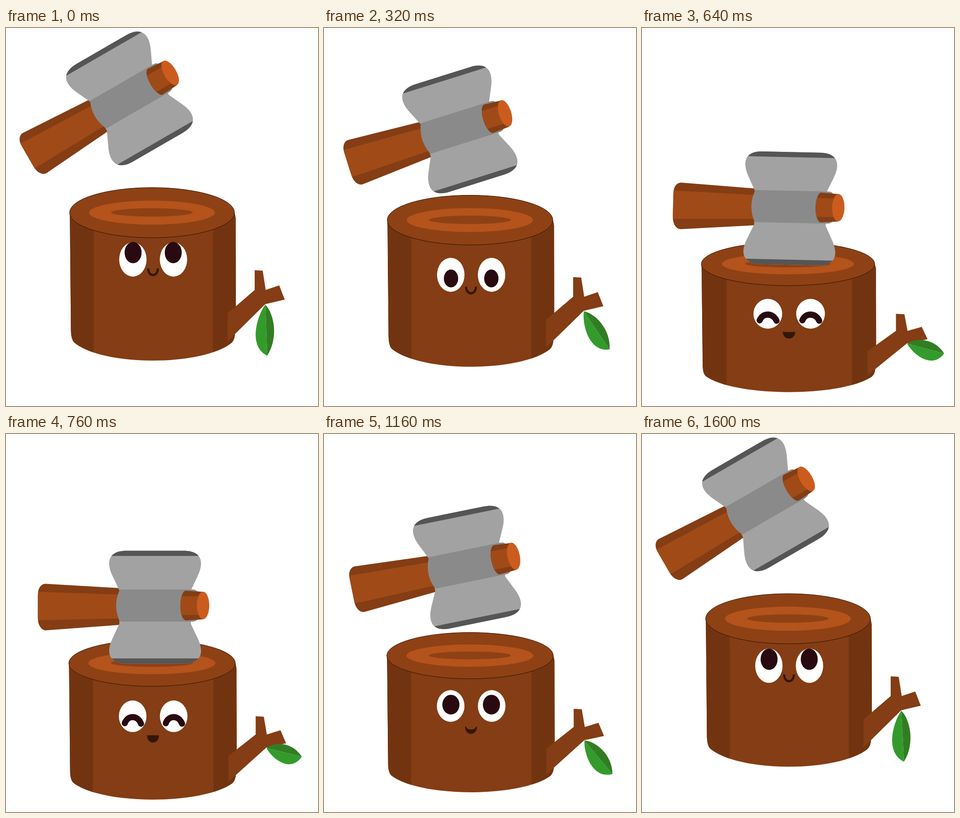
Recreate the animation shown at these times as an HTML page. Size 680x824 px, loop 1.64 s.

```html
<!DOCTYPE html>
<html lang="en">
<head>
<meta charset="utf-8">
<title>Axe and stump</title>
<style>
  html, body { margin: 0; width: 100%; height: 100%; overflow: hidden; background: #fff; }
  svg { display: block; width: 100%; height: 100%; }
</style>
</head>
<body>
<svg viewBox="0 0 680 824">
  <defs>
    <path id="trunk" d="M139 403L139.5 440L141.5 660Q142 678 148 685C180 712 250 725 320 725S460 712 492 686Q499 679 499.5 662L501 600L500.5 414L498 402Z"/>
    <clipPath id="trunkClip"><use href="#trunk"/></clipPath>
    <path id="blade" d="M-78 -28V-36L-93 -68C-108 -100 -100 -122.5 -62 -122.5H62C100 -122.5 108 -100 93 -68L78 -36V-28Z"/>
    <clipPath id="bladeClip"><use href="#blade"/></clipPath>
    <g id="bladeHalf">
      <use href="#blade" fill="#a2a2a2"/>
      <rect x="-110" y="-124" width="220" height="12.8" fill="#555" clip-path="url(#bladeClip)"/>
    </g>
    <ellipse id="white" rx="29.8" ry="37.4" fill="#fff"/>
    <ellipse id="pupil" rx="18.5" ry="23.3" fill="#280a10"/>
    <path id="lid" d="M-17 16.5C-11 -3 11 -3 18 17.5" fill="none" stroke="#280a10" stroke-width="13.3" stroke-linecap="round" vector-effect="non-scaling-stroke"/>
  </defs>

  <g id="stump">
    <use href="#trunk" fill="#843d14"/>
    <path d="M130 390H191V730H130ZM451 390H510V730H451Z" fill="#723410" clip-path="url(#trunkClip)"/>
    <ellipse cx="318.3" cy="402.5" rx="179.7" ry="54.7" fill="#8e4114" stroke="#2b1206" vector-effect="non-scaling-stroke"/>
    <ellipse cx="318" cy="402.5" rx="137" ry="26.3" fill="#b4531b"/>
    <ellipse cx="318" cy="402" rx="88.7" ry="9.2" fill="#8e4114"/>
    <path d="M483 622L542 571V528L559.5 529L566 571L595.5 561L607.5 592L565 602L483 683Z" fill="#843d14"/>
    <g id="eyes">
      <use href="#white" x="276.5"/><use href="#white" x="365"/>
      <g id="open"><use href="#pupil"/><use href="#pupil"/></g>
      <g id="closed"><use href="#lid" x="276.5"/><use href="#lid" x="365"/></g>
    </g>
    <path id="mouth" fill="#331708"/>
  </g>

  <g id="leaf">
    <path d="M0 0C-17 20 -43 88 0 111Z" fill="#339b2b"/>
    <path d="M0 0C18 20 27 72 0 111Z" fill="#327d23"/>
  </g>

  <g id="axe">
    <path d="M-239 -50.5L-76 -41V39L-238 51C-249 51 -255.5 38 -255.5 25V-27C-255.5 -42 -248 -50.5 -239 -50.5Z" fill="#843d14"/>
    <path d="M-254.5 -33L-76 -27V25L-254 29Q-255.5 25 -255.5 20V-24Z" fill="#a04a17"/>
    <use href="#bladeHalf"/>
    <use href="#bladeHalf" transform="translate(0 1) scale(1 -1)"/>
    <path d="M-77 -38Q-93 -3 -77 32H82Q94 31 94 20V-26Q94 -38 82 -38Z" fill="#8a8a8a"/>
    <path d="M67 -35.5A12 32.5 0 0 0 67 29.5L104 27V-33Z" fill="#843d14"/>
    <path d="M57.7 -23.5A12 32.5 0 0 0 57.7 17.5H98V-23.5Z" fill="#a04a17"/>
    <ellipse cx="104.5" cy="-3.3" rx="13.5" ry="30" fill="#cb5c1e"/>
  </g>
</svg>
<script>
const LOOP = 1640, STEP = 40;
const HIT = 480, REST = 760, RISE = 1120;
const $ = id => document.getElementById(id);
const set = (el, name, value) => el.setAttribute(name, value);
const mix = (a, b, p) => a + (b - a) * p;

// Accelerates from ready to hit, settles to rest, then springs back to ready.
const motion = (ready, hit, rest, dropPower, riseTime, risePower) => t => {
  if (t < HIT) return mix(ready, hit, (t / HIT) ** dropPower);
  if (t < RISE) {
    const s = Math.min(1, (t - HIT) / (REST - HIT));
    return mix(hit, rest, s * s * (3 - 2 * s));
  }
  return mix(ready, rest, Math.exp(-(((t - RISE) / riseTime) ** risePower)));
};

const axeX = motion(269, 320.5, 325, 1.6, 91, 1.57);
const axeY = motion(153, 417, 377, 3.36, 70, 1.28);
const axeAngle = motion(-30, 3.2, 0, 2.4, 72, 1.24);
const stretchX = motion(1, 1.116, 1.01, 8, 147, 3);
const stretchY = motion(1, .781, .922, 8, 147, 3);
const base = motion(724, 788, 796, 3.85, 118, 1.28);
const leafAngle = motion(2, 73.8, 76, 2, 68, .76);
const leafLength = motion(111.5, 89.5, 79.3, 1.7, 68, .76);
const eyeY = motion(504.5, 528, 528, .6, 120, 1);
const pupilY = motion(-15, 19.5, 0, 1, 170, 1);
const pupilSize = motion(1, .76, 1, 1, 50, 1);
const mouthY = motion(524, 574, 573, 1.7, 142, 2.2);
const smile = motion(1, .12, 0, 8, 48, 1.28);

function drawMouth(t) {
  const k = smile(t), edge = 12.8 - 4.5 * k, depth = 16.2 * k;
  set($('mouth'), 'transform', `translate(320.4 ${mouthY(t)})`);
  set($('mouth'), 'd', `M-12.8 0C-12.8 22.7 12.8 22.7 12.8 0H${edge}C${edge} ${depth} ${-edge} ${depth} ${-edge} 0Z`);
}

function drawEyes(t) {
  const shut = t >= HIT - STEP && t < RISE + STEP;
  set($('eyes'), 'transform', `translate(0 ${eyeY(t)})`);
  set($('open'), 'display', shut ? 'none' : 'inline');
  set($('closed'), 'display', shut ? 'inline' : 'none');
  [277, 364.5].forEach((x, i) =>
    set($('open').children[i], 'transform', `translate(${x} ${pupilY(t)}) scale(${pupilSize(t)})`));
}

// The leaf hangs from the twig but is not squashed with the stump.
function drawLeaf(t) {
  const x = 320 + 245.3 * stretchX(t), y = base(t) - 121 * stretchY(t);
  set($('leaf'), 'transform',
    `translate(${x} ${y}) rotate(${-leafAngle(t)}) scale(1 ${leafLength(t) / 111})`);
}

function draw() {
  const t = Math.floor(performance.now() / STEP) * STEP % LOOP;
  set($('stump'), 'transform',
    `translate(320 ${base(t)}) scale(${stretchX(t)} ${stretchY(t)}) translate(-320 -724)`);
  set($('axe'), 'transform', `translate(${axeX(t)} ${axeY(t)}) rotate(${axeAngle(t)})`);
  drawLeaf(t);
  drawEyes(t);
  drawMouth(t);
  requestAnimationFrame(draw);
}
draw();
</script>
</body>
</html>
```
